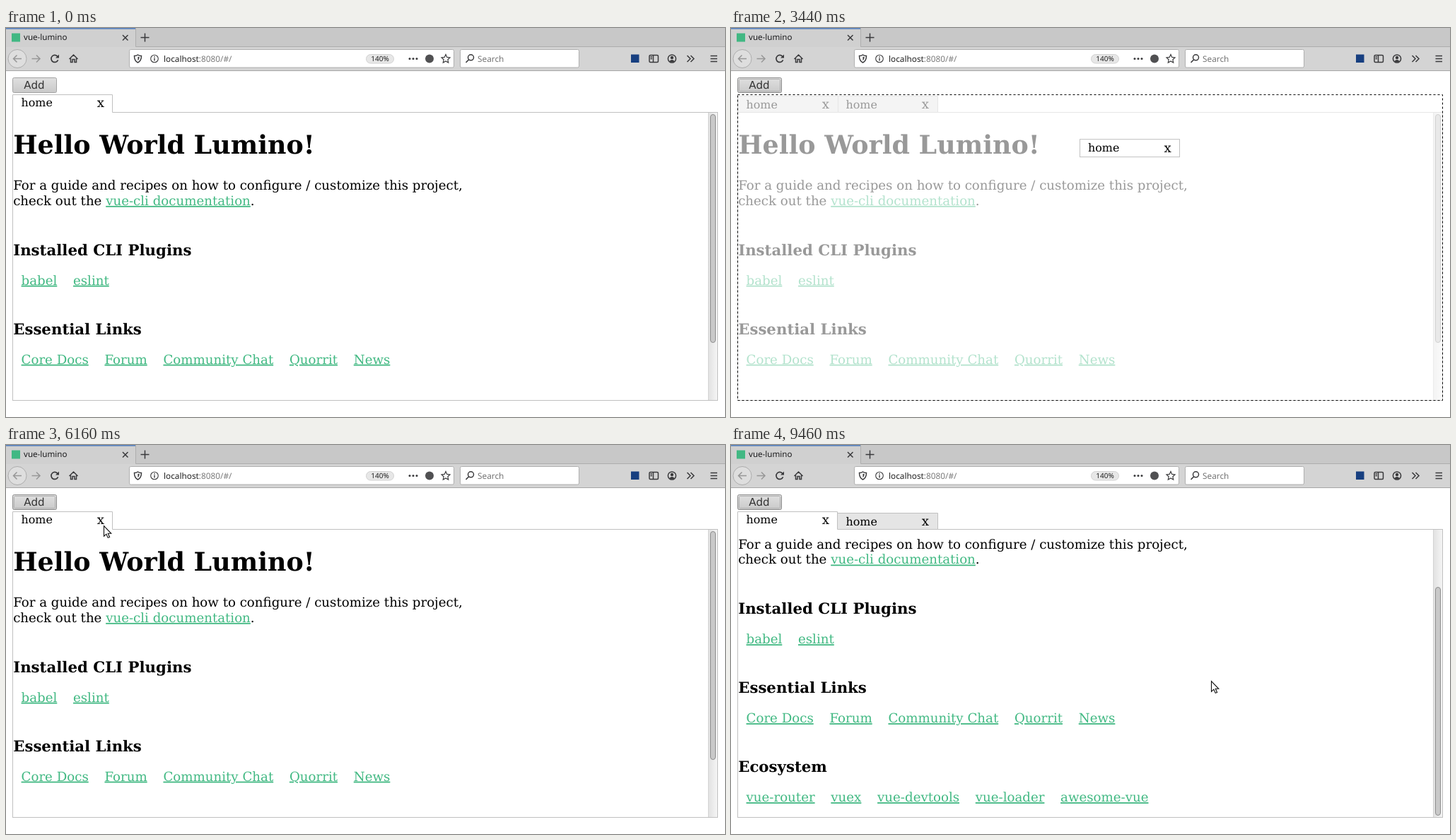
An HTML page for the animation above (9.62 s loop, 1017 by 551 pixels).

```html
<!DOCTYPE html>
<html lang="en">
<head>
<meta charset="utf-8">
<title>vue-lumino</title>
<style>
  html, body { margin: 0; width: 100%; height: 100%; overflow: hidden; background: #fff; }
  svg { display: block; width: 1017px; height: 551px; text-rendering: geometricPrecision; }
  .ui { font-family: "Noto Sans", sans-serif; font-size: 11.8px; }
  .page { font-family: "DejaVu Serif", serif; font-size: 18.2px; fill: #000; }
  .h1 { font-size: 36.4px; font-weight: bold; }
  .h3 { font-size: 21.29px; font-weight: bold; }
  .link { fill: #42b983; text-decoration: underline; text-decoration-thickness: 1px; text-underline-offset: 1.5px; }
  .tab { font-family: "DejaVu Serif", serif; font-size: 15.92px; }
  .close { font-size: 18.2px; text-anchor: middle; }
  .icon { fill: none; stroke: #3a3a3c; stroke-width: 1.5; }
</style>
</head>
<body>
<svg viewBox="0 0 1017 551" xmlns="http://www.w3.org/2000/svg">
  <defs>
    <linearGradient id="normal" x2="0" y2="1"><stop stop-color="#e0e0e0"/><stop offset="1" stop-color="#c9c9c9"/></linearGradient>
    <linearGradient id="hover" x2="0" y2="1"><stop stop-color="#eeeeee"/><stop offset="1" stop-color="#d9d9d9"/></linearGradient>
    <linearGradient id="pressed" x2="0" y2="1"><stop stop-color="#b8b8b8"/><stop offset="1" stop-color="#c6c6c6"/></linearGradient>
    <linearGradient id="track"><stop stop-color="#e2e2e2"/><stop offset="1" stop-color="#f5f5f5"/></linearGradient>
  </defs>
  <rect width="1017" height="551" fill="#fff"/>

  <g class="ui">
    <rect width="1017" height="27" fill="#c8c8c8"/>
    <rect y="27" width="1017" height="33" fill="#d4d4d4"/>
    <rect width="183" height="27" fill="#d0d0d0"/>
    <rect width="183" height="1.6" fill="#5580bd"/>
    <path d="M183.5 0V26.5H1017" fill="none" stroke="#adadad"/>
    <path d="M0 60.5H1017" stroke="#a6a6a6"/>
    <rect x="8" y="7.500" width="12" height="12" fill="#41b883"/>
    <text x="25" y="17.300" font-size="11.6" fill="#1c1c1e">vue-lumino</text>
    <path class="icon" d="M165 10l7.500 7.500M172.500 10l-7.500 7.500M190.500 13.500h12M196.500 7.500v12"/>

    <circle cx="16" cy="43.500" r="13" fill="#dedede" stroke="#adadad"/>
    <g class="icon" style="stroke:#979797">
      <path d="M22 43.500H10.500M15.500 38.500l-5 5l5 5"/>
      <path d="M36.500 43.500H48M43 38.500l5 5l-5 5"/>
    </g>
    <g class="icon">
      <path d="M73 40.500a5 5 0 1 0 .6 4.800" stroke-width="1.7"/>
      <path d="M75 37.500v5h-5z" fill="#3a3a3c" stroke="none"/>
      <path d="M89.500 44l6-6l6 6M91.500 43v5.500h2.500v-4h3v4h2.500V43"/>
    </g>

    <rect x="174.500" y="30.500" width="459" height="25.500" rx="2" fill="#fff" stroke="#b0b0b0"/>
    <rect x="642.500" y="30.500" width="168" height="25.500" rx="2" fill="#fff" stroke="#b0b0b0"/>
    <g class="icon" stroke-width="1.3">
      <path d="M181.500 39.500q3 0 5-1.500q2 1.500 5 1.500q0 7-5 9.500q-5-2.500-5-9.500z"/>
      <path d="M186.500 40.500v6q2-1.500 2.300-5.200z" fill="#3a3a3c" stroke="none"/>
      <circle cx="210" cy="43.500" r="5.300" stroke-width="1.100"/>
      <path d="M210 42.500v4M210 40v1.400" stroke-width="1.400"/>
      <path d="M622 37.500l1.800 3.900l4.200.5l-3.100 2.900l.8 4.200l-3.700-2.100l-3.700 2.100l.8-4.200l-3.100-2.900l4.200-.5z" stroke-width="1.200"/>
      <circle cx="657.500" cy="41.800" r="4"/>
      <path d="M654.700 44.700l-4.200 4.200"/>
      <rect x="910" y="38.500" width="12.500" height="10" rx="1.500"/>
      <path d="M915.500 38.500v10M911.500 41h2.500M911.500 43.500h2.500"/>
      <circle cx="942" cy="43.500" r="5.600"/>
      <path d="M963.500 39l4.500 4.500l-4.500 4.500M968.500 39l4.500 4.500l-4.500 4.500"/>
      <path d="M996.500 39.500h9.500M996.500 43.500h9.500M996.500 47.500h9.500"/>
    </g>
    <g fill="#3a3a3c">
      <circle cx="571" cy="43.500" r="1.500"/><circle cx="576" cy="43.500" r="1.500"/><circle cx="581" cy="43.500" r="1.500"/>
      <circle cx="599" cy="43.500" r="6" fill="#505052"/>
      <circle cx="942" cy="42" r="2.200"/><path d="M938.300 47q3.700-3.800 7.400 0q-3.700 3-7.400 0z"/>
    </g>
    <rect x="884" y="37.500" width="11.500" height="11.500" fill="#173f80"/>
    <text x="223" y="47.500" fill="#222">localhost<tspan fill="#7a7a7a">:8080/#/</tspan></text>
    <rect x="509.500" y="37.500" width="39" height="12.500" rx="6.200" fill="#e7e7e7" stroke="#d2d2d2"/>
    <text x="529" y="47.300" font-size="10" text-anchor="middle" fill="#222">140%</text>
    <text x="667" y="47.500" fill="#757575">Search</text>
  </g>

  <g id="button">
    <rect id="face" x="9.500" y="70.500" width="62" height="21" rx="2"/>
    <rect id="ring" x="11.500" y="72.500" width="58" height="17" rx="1" fill="none" stroke="#b0b0b0"/>
    <text x="40" y="86.300" text-anchor="middle" font-family="DejaVu Sans, sans-serif" font-size="15.12" fill="#333">Add</text>
  </g>
  <g id="panels"></g>
  <g id="tabs"></g>
  <rect id="overlay" fill="#fff" fill-opacity=".6" stroke="#000" stroke-dasharray="3 3"/>
  <g id="ghost"></g>
  <path id="cursor" d="M.5.5V15.200L3.900 12.200L6.200 17.400L8.600 16.400L6.300 11.300H10.800Z" fill="#fff" stroke="#111" stroke-width="1.100"/>
</svg>

<script>
const LOOP = 9620;
const MAX_SCROLL = 82.5;
const LINE = 21.93;
const GAP = 22.74;
const BORDER = '#c0c0c0';
const $ = id => document.getElementById(id);
const clamp = v => Math.max(0, Math.min(1, v));
const smooth = v => v * v * (3 - 2 * v);
const lerp = (a, b, k) => a + (b - a) * k;
const within = (t, a, b) => t >= a && t < b;
const show = (el, on) => el.setAttribute('display', on ? 'inline' : 'none');
const setAll = (el, attrs) => { for (const k in attrs) el.setAttribute(k, attrs[k]); };

const line = (x, y, body, cls = '') => `<text x="${x}" y="${y}" class="${cls}">${body}</text>`;
const link = (s, dx = 0) => `<tspan class="link" dx="${dx}">${s}</tspan>`;
const links = (x, y, names) => line(x, y, names.map((s, i) => link(s, i ? GAP : 0)).join(''));

// Page text; a narrow column wraps the intro and the second list.
function article(x, narrow) {
  const drop = narrow ? LINE : 0;
  const inset = x + GAP / 2;
  const essential = ['Core Docs', 'Forum', 'Community Chat', 'Quorrit'];
  const intro = 'For a guide and recipes on how to configure /';
  let out = line(x, 178.2, 'Hello World Lumino!', 'h1');
  out += narrow
    ? line(x, 229, intro) + line(x, 229 + LINE, 'customize this project,')
    : line(x, 229, intro + ' customize this project,');
  out += line(x, 229 + LINE + drop, 'check out the ' + link('vue-cli documentation') + '.');
  out += line(x, 321.8 + drop, 'Installed CLI Plugins', 'h3');
  out += links(inset, 363.7 + drop, ['babel', 'eslint']);
  out += line(x, 433.7 + drop, 'Essential Links', 'h3');
  out += links(inset, 475.6 + drop, narrow ? essential : [...essential, 'News']);
  if (narrow) return out + links(inset, 475.6 + 2 * LINE, ['News']);
  out += line(x, 545.8, 'Ecosystem', 'h3');
  return out + links(inset, 587.6, ['vue-router', 'vuex', 'vue-devtools', 'vue-loader', 'awesome-vue']);
}

function panel(id, left, right, textX, thumb, narrow) {
  return `<g id="${id}">
    <clipPath id="${id}Clip"><rect x="${left}" y="120" width="${right - left - 12}" height="407"/></clipPath>
    <rect x="${left + .5}" y="119.5" width="${right - left}" height="408" fill="#fff" stroke="${BORDER}"/>
    <rect x="${right - 12}" y="120" width="12" height="407" fill="url(#track)"/>
    <path d="M${right - 12.5} 120V527" stroke="#d4d4d4"/>
    <rect id="${id}Thumb" x="${right - 9.5}" y="122.5" width="7" height="${thumb}" rx="3.5" fill="#c9c9c9" stroke="#8d8d8d"/>
    <g clip-path="url(#${id}Clip)"><g id="${id}Text" class="page">${article(textX, narrow)}</g></g>
  </g>`;
}

$('panels').innerHTML = panel('wide', 9, 1006, 10.2, 323, false)
  + panel('west', 9, 505, 10.2, 279, true) + panel('east', 511, 1006, 511.5, 279, true);

function tab(x, active) {
  const top = active ? 94.5 : 96.5;
  const right = x + (active ? 141 : 142);
  const base = active ? 111.3 : 113.7;
  return `<g class="tab">
    <rect x="${x}" y="${top}" width="${right - x}" height="${120 - top}" fill="${active ? '#fff' : '#e5e5e5'}"/>
    <path d="M${x} ${active ? 120 : 119.5}V${top}H${right}V119.5${active ? '' : 'H' + x}" fill="none" stroke="${BORDER}"/>
    ${line(x + 12, base, 'home')}${line(x + 124.5, base + .7, 'x', 'close')}</g>`;
}

// Earlier tabs overlap later ones; the active tab is on top.
function tabBar(x, count, active) {
  let out = '';
  for (let i = count - 1; i >= 0; i--) if (i !== active) out += tab(x + 141 * i, false);
  return active >= 0 ? out + tab(x + 141 * active, true) : out;
}

$('ghost').innerHTML = `<rect x=".5" y=".5" width="141" height="25" fill="#fff" stroke="${BORDER}"/>
  <g class="tab">${line(12, 17.7, 'home')}${line(124.5, 18.4, 'x', 'close')}</g>`;

const DRAG = { start: 2950, detach: 3080, split: 3480, end: 3870, drop: 4080 };

// time, x, y
const path = [
  [4080, 715, 322], [4190, 715, 322], [4800, 288, 93], [4990, 272, 112],
  [5230, 272, 112], [5570, 153, 107], [5960, 138, 114], [6720, 138, 114],
  [7100, 49, 85], [7580, 49, 85], [7870, 79, 111], [8390, 79, 111],
  [8780, 655, 357], [8960, 679, 334], [LOOP, 679, 334]
];

function pointer(t) {
  let i = 0;
  while (i < path.length - 2 && t >= path[i + 1][0]) i++;
  const [a, b] = [path[i], path[i + 1]];
  const k = smooth(clamp((t - a[0]) / (b[0] - a[0])));
  return [lerp(a[1], b[1], k), lerp(a[2], b[2], k)];
}

function tabsAt(t, dragX) {
  if (t < 490) return tabBar(9.5, 1, 0);
  if (t < 1110) return tabBar(9.5, 2, 0);
  if (t < 1780) return tabBar(9.5, 3, 0);
  if (t < 2430) return tabBar(9.5, 3, 1);
  if (t < DRAG.start) return tabBar(9.5, 3, 2);
  if (t < DRAG.detach) return tabBar(9.5, 2, -1) + tab(291.5 + dragX - 348, true);
  if (t < DRAG.drop) return tabBar(9.5, 2, -1);
  if (t < 5100) return tabBar(9.5, 2, 1) + tabBar(511.5, 1, 0);
  if (t < 6110) return tabBar(9.5, 1, 0) + tabBar(511.5, 1, 0);
  if (t < 6710) return tabBar(9.5, 1, 0);
  if (t < 7250) return '';
  return tabBar(9.5, t < 7590 ? 1 : 2, 0);
}

function drawButton(t) {
  const hover = within(t, 200, 1340) || within(t, 7020, 7760);
  const pressed = within(t, 360, 490) || within(t, 1030, 1110)
    || within(t, 7150, 7250) || within(t, 7480, 7590);
  const focus = t >= 360;
  setAll($('face'), {
    fill: `url(#${pressed ? 'pressed' : hover ? 'hover' : 'normal'})`,
    stroke: hover || focus ? '#8c8c8c' : '#a3a3a3'
  });
  show($('ring'), focus);
}

function drawDrag(t, x, y) {
  const on = within(t, DRAG.detach, DRAG.drop);
  show($('ghost'), on);
  show($('overlay'), on);
  $('ghost').setAttribute('transform', `translate(${x - 57} ${y - 15})`);
  const left = lerp(9.5, 508.5, smooth(clamp((t - DRAG.split) / 150)));
  setAll($('overlay'), { x: left, y: 94.5, width: 1006.5 - left, height: 433 });
}

let lastTabs = null;

function draw(t) {
  const k = smooth(clamp((t - DRAG.start) / (DRAG.end - DRAG.start)));
  const dragX = lerp(348, 715, k);
  const dragY = lerp(107, 322, k * k);
  const tabs = tabsAt(t, dragX);
  if (tabs !== lastTabs) $('tabs').innerHTML = lastTabs = tabs;

  const split = within(t, DRAG.drop, 6110);
  show($('west'), split);
  show($('east'), split);
  show($('wide'), !split && !within(t, 6710, 7250));

  const scroll = 1 - (1 - clamp((t - 9220) / 240)) ** 2;
  $('wideText').setAttribute('transform', `translate(0 ${-MAX_SCROLL * scroll})`);
  $('wideThumb').setAttribute('y', 122.5 + 79 * scroll);

  drawButton(t);
  drawDrag(t, dragX, dragY);
  show($('cursor'), t >= DRAG.drop);
  $('cursor').setAttribute('transform', `translate(${pointer(t).join(' ')})`);
}

const begin = performance.now();
function tick() {
  draw((performance.now() - begin) % LOOP);
  requestAnimationFrame(tick);
}
tick();
</script>
</body>
</html>
```
